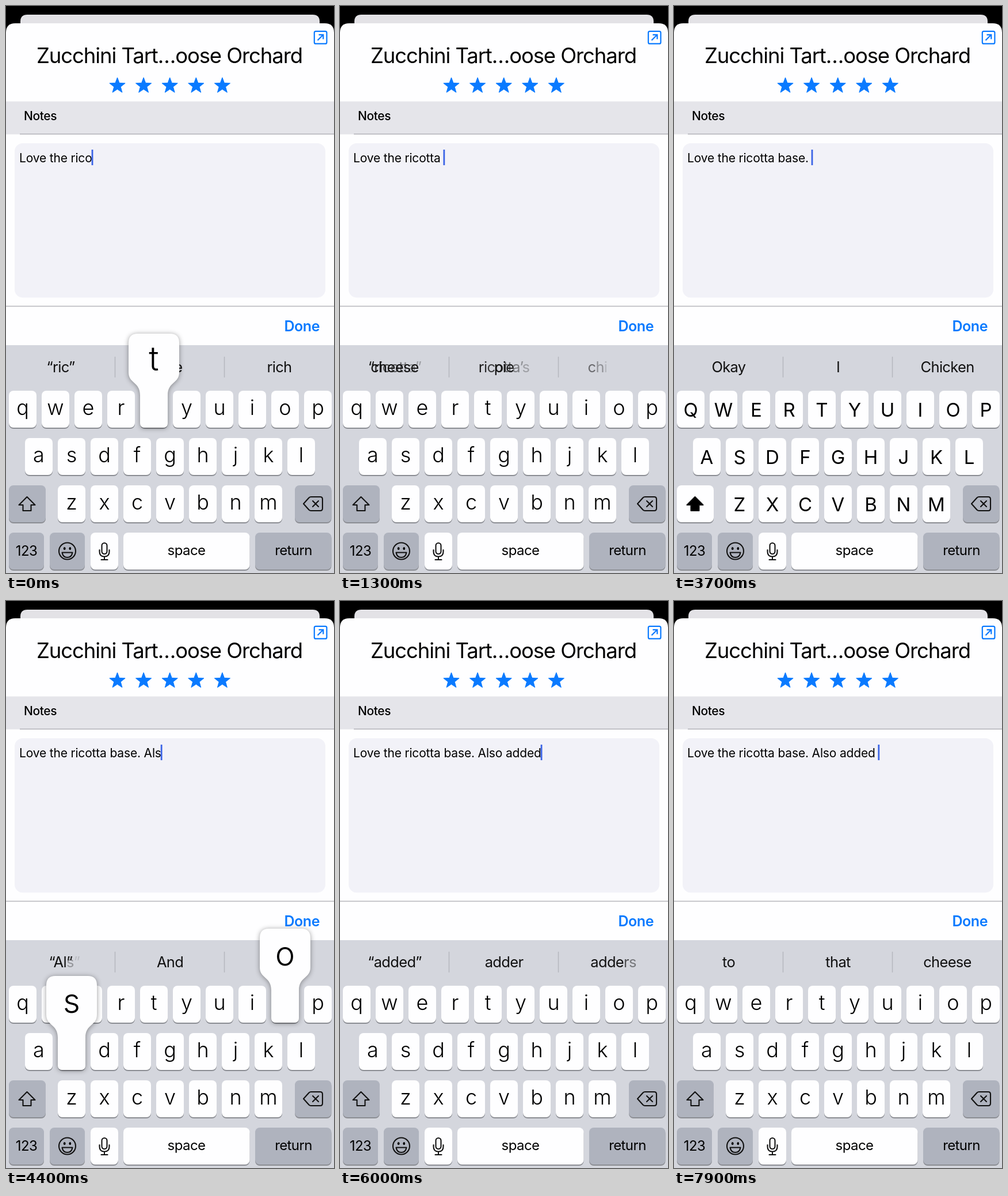
Recreate the animation shown at these times as an HTML page. Size 570x983 px, loop 8000 ms.

```html
<!DOCTYPE html>
<html lang="en">
<head>
<meta charset="utf-8">
<title>Typing a note</title>
<style>
  html, body { margin: 0; width: 100%; height: 100%; overflow: hidden; background: #000; }
  svg { display: block; width: 100%; height: 100%; font-family: Inter, "Liberation Sans", sans-serif; }
  text { white-space: pre; }
  .mid { text-anchor: middle; }
  .title { font-size: 36.5px; letter-spacing: -1.1px; }
  .head { font-size: 21px; font-weight: 500; letter-spacing: -.4px; }
  .note { font-size: 21px; letter-spacing: -.17px; }
  .done { font-size: 25px; font-weight: 600; letter-spacing: -.45px; text-anchor: end; fill: #0a7aff; }
  .word { font-size: 25.5px; letter-spacing: -.7px; fill: #111; }
  .lower { font-size: 36px; font-weight: 350; text-anchor: middle; }
  .upper { font-size: 33px; text-anchor: middle; }
  .big { font-size: 58px; font-weight: 350; text-anchor: middle; }
  .label { font-size: 24px; letter-spacing: -.6px; text-anchor: middle; }
  .popup { fill: #fefeff; filter: drop-shadow(0 1px 4px rgba(0, 0, 0, .4)); }
  .icon { fill: none; stroke: #111; stroke-width: 2.1; stroke-linejoin: round; stroke-linecap: round; }
</style>
</head>
<body>
<svg viewBox="0 0 570 983" xmlns="http://www.w3.org/2000/svg">
  <rect width="570" height="983"/>
  <path d="M25 60V27q0-12 12-12H533q12 0 12 12V60Z" fill="#e3e2e6"/>
  <path d="M0 983V46q0-16 16-16H554q16 0 16 16V983Z" fill="#fefeff"/>
  <g fill="none" stroke="#0a7aff" stroke-width="2.2">
    <rect x="535.8" y="43.8" width="21.6" height="21.6" rx="2.5"/>
    <path d="M541.5 59.5L551 50M543.5 49.8H551.3V57.6"/>
  </g>
  <text class="title mid" x="284" y="99">Zucchini Tart…oose Orchard</text>
  <g id="stars" fill="#0a7aff" stroke="#0a7aff" stroke-linejoin="round"></g>
  <rect y="165.5" width="570" height="57" fill="#e5e5ea"/>
  <text class="head" x="31" y="197.5">Notes</text>
  <path d="M24 222H570M0 520.5H570" stroke="#b5b5ba" stroke-width="1.5"/>
  <rect x="15" y="238" width="540" height="267.5" rx="14" fill="#f2f2f8"/>
  <text class="note" id="note" x="23" y="271" xml:space="preserve"></text>
  <rect id="caret" y="249" width="2.8" height="27" fill="#3b64e6"/>
  <text class="done" x="545" y="564">Done</text>
  <rect y="588" width="570" height="395" fill="#d4d6dd"/>
  <path d="M189.5 608V644M379.5 608V644" stroke="#b5b7be" stroke-width="1.5"/>
  <text class="word" id="ruler" visibility="hidden"></text>
  <g id="live"></g>
</svg>
<script>
const LOOP = 8000, LINGER = 90;
const WHITE = '#fefeff', GREY = '#afb3be';
const $ = id => document.getElementById(id);
const clamp = v => Math.max(0, Math.min(1, v));

// key, time pressed, time committed, suggestions after it
const strokes = [
  ['', -9999, -9999, '“ric”,rice,rich'],
  ['t', -50, 100, '“ricot”,ricotta,ricotta’s'],
  ['t', 380, 500, '“ricott”,ricotta,ricotta’s'],
  ['a', 700, 830, '“ricotta”,ricotta’s,'],
  [' ', 1010, 1140, 'cheese,pie,chicken'],
  ['b', 1370, 1500, '“b”,but,base'],
  ['a', 1570, 1680, '“ba”,base,baked'],
  ['s', 1730, 1850, '“bas”,base,basil'],
  ['e', 1850, 1960, '“base”,based,bases'],
  [' ', 2620, 2720, 'and,for,on'],
  [' ', 3040, 3150, 'Okay,I,Chicken'],
  ['A', 3760, 3880, '“A”,And,Also'],
  ['l', 3980, 4090, '“Al”,And,Also'],
  ['s', 4200, 4332, '“Als”,And,Also'],
  ['o', 4332, 4520, '“Also”,Alsop,Alsos'],
  [' ', 4720, 4830, 'the,I,a'],
  ['a', 5010, 5120, '“a”,and,add'],
  ['d', 5200, 5320, '“ad”,add,added'],
  ['d', 5420, 5500, '“add”,added,adds'],
  ['e', 5560, 5660, '“adde”,added,addend'],
  ['d', 5690, 5770, '“added”,adder,adders'],
  [' ', 7430, 7550, 'to,that,cheese']
].map(([key, press, commit, words]) => ({ key, press, commit, words: words.split(',') }));

const keys = [['qwertyuiop', 5], ['asdfghjkl', 33], ['zxcvbnm', 90]].flatMap(([row, left], r) =>
  [...row].map((letter, i) => ({ letter, x: left + 57 * i, y: 667 + 82 * r })));

const text = (cls, x, y, body) => `<text class="${cls}" x="${x}" y="${y}">${body}</text>`;
const cap = (x, y, w, fill = WHITE) =>
  `<rect x="${x}" y="${y + 2}" width="${w}" height="64" rx="8" fill="#8b8d93"/>` +
  `<rect x="${x}" y="${y}" width="${w}" height="64" rx="8" fill="${fill}"/>`;

function star(cx, cy) {
  const points = Array.from({ length: 10 }, (_, i) => {
    const r = i % 2 ? 6 : 14.3, a = i * Math.PI / 5;
    return [cx + r * Math.sin(a), cy - r * Math.cos(a)].map(v => v.toFixed(2));
  });
  return `<polygon points="${points.join(' ')}"/>`;
}

function keyboard(caps, spaceDown) {
  const letters = keys.map(k => cap(k.x, k.y, 48) + (caps
    ? text('upper', k.x + 24, k.y + 44.5, k.letter.toUpperCase())
    : text('lower', k.x + 24, k.y + 42, k.letter))).join('');
  return letters +
    cap(5, 831, 64, caps ? WHITE : GREY) + cap(502, 831, 63.5, GREY) +
    cap(5, 913, 61, GREY) + cap(76, 913, 61, GREY) + cap(147, 913, 48) +
    cap(204, 913, 219.5, spaceDown ? GREY : WHITE) + cap(433, 913, 132.5, GREY) +
    text('label', 35.5, 953, '123') + text('label', 313.5, 952, 'space') + text('label', 499.5, 952, 'return') +
    `<g class="icon">
      <path d="M36.5 851L50.5 865H43.5V875H29.5V865H22.5Z" style="fill:${caps ? '#000' : 'none'}"/>
      <path d="M517 863L526.5 852.5Q528 851 530 851H546Q550 851 550 855V871Q550 875 546 875H530Q528 875 526.5 873.5ZM533 858L543 868M543 858L533 868"/>
      <circle cx="106.5" cy="945" r="14.5"/>
      <path d="M97.5 947.5H115.5Q114 956 106.5 956T97.5 947.5Z"/>
      <rect x="166.5" y="931" width="9" height="19" rx="4.5"/>
      <path d="M162.5 943V946Q162.5 954.5 171 954.5T179.5 946V943M171 954.5V960M165.5 960H176.5"/>
    </g>
    <ellipse cx="101.7" cy="940.5" rx="1.9" ry="2.6"/><ellipse cx="111.3" cy="940.5" rx="1.9" ry="2.6"/>`;
}

function popup(char) {
  const { x, y } = keys.find(k => k.letter === char.toLowerCase());
  const c = x + 24;
  return `<path class="popup" d="M${c - 44} ${y - 32}V${y - 83}q0-16 16-16h56q16 0 16 16V${y - 32}
    C${c + 44} ${y - 12} ${c + 24} ${y - 16} ${c + 24} ${y + 8}V${y + 56}q0 8-8 8h-32q-8 0-8-8V${y + 8}
    C${c - 24} ${y - 16} ${c - 44} ${y - 12} ${c - 44} ${y - 32}Z"/>` + text('big', c, y - 35, char);
}

function widthOf(word) {
  $('ruler').textContent = word;
  return $('ruler').getComputedTextLength();
}

function sharedPrefix(a, b) {
  let n = 0;
  while (n < a.length && a[n] === b[n]) n++;
  return n;
}

// New letters appear from the left, old ones fade from the right; a shared beginning stays and slides.
function suggestion(now, before, slot, age) {
  const home = word => 95 + 190 * slot - widthOf(word) / 2;
  const draw = (word, x, alpha) => text('word', x, 634.5,
    [...word].map((c, i) => `<tspan fill-opacity="${clamp(alpha(i)).toFixed(2)}">${c}</tspan>`).join(''));
  const shared = sharedPrefix(now, before), end = home(now);
  const x = shared ? end + (home(before) - end) * (1 - clamp((age - 70) / 160)) : end;
  const stale = draw(before, home(before), i =>
    i < shared ? 0 : 1 - (age - 60 - 12 * (before.length - 1 - i)) / 140);
  return stale + draw(now, x, i => i < shared ? 1 : (age - 60 * slot - 15 * i) / 75);
}

function render(t) {
  const done = strokes.filter(s => s.commit <= t);
  const last = done[done.length - 1], before = done[done.length - 2] || last;
  const typed = done.reduce((str, s) => (str + s.key).replace(/ {2}$/, '. '), 'Love the rico');
  const held = strokes.filter(s => s.key && s.press <= t && t < s.commit + LINGER);
  const age = t - last.commit;

  $('note').textContent = typed;
  $('caret').setAttribute('x', 22 + $('note').getComputedTextLength());
  $('caret').setAttribute('opacity', 1 - clamp((age - 690) / 150) + clamp((age - 1020) / 180));
  $('live').innerHTML = last.words.map((w, slot) => suggestion(w, before.words[slot], slot, age)).join('') +
    keyboard(typed.endsWith('. '), held.some(s => s.key === ' ')) +
    held.filter(s => s.key !== ' ').map(s => popup(s.key)).join('');
}

$('stars').innerHTML = [0, 1, 2, 3, 4].map(i => star(193.5 + 45.6 * i, 138.3)).join('');
const start = performance.now();
function tick() {
  render((performance.now() - start) % LOOP);
  requestAnimationFrame(tick);
}
tick();
</script>
</body>
</html>
```
